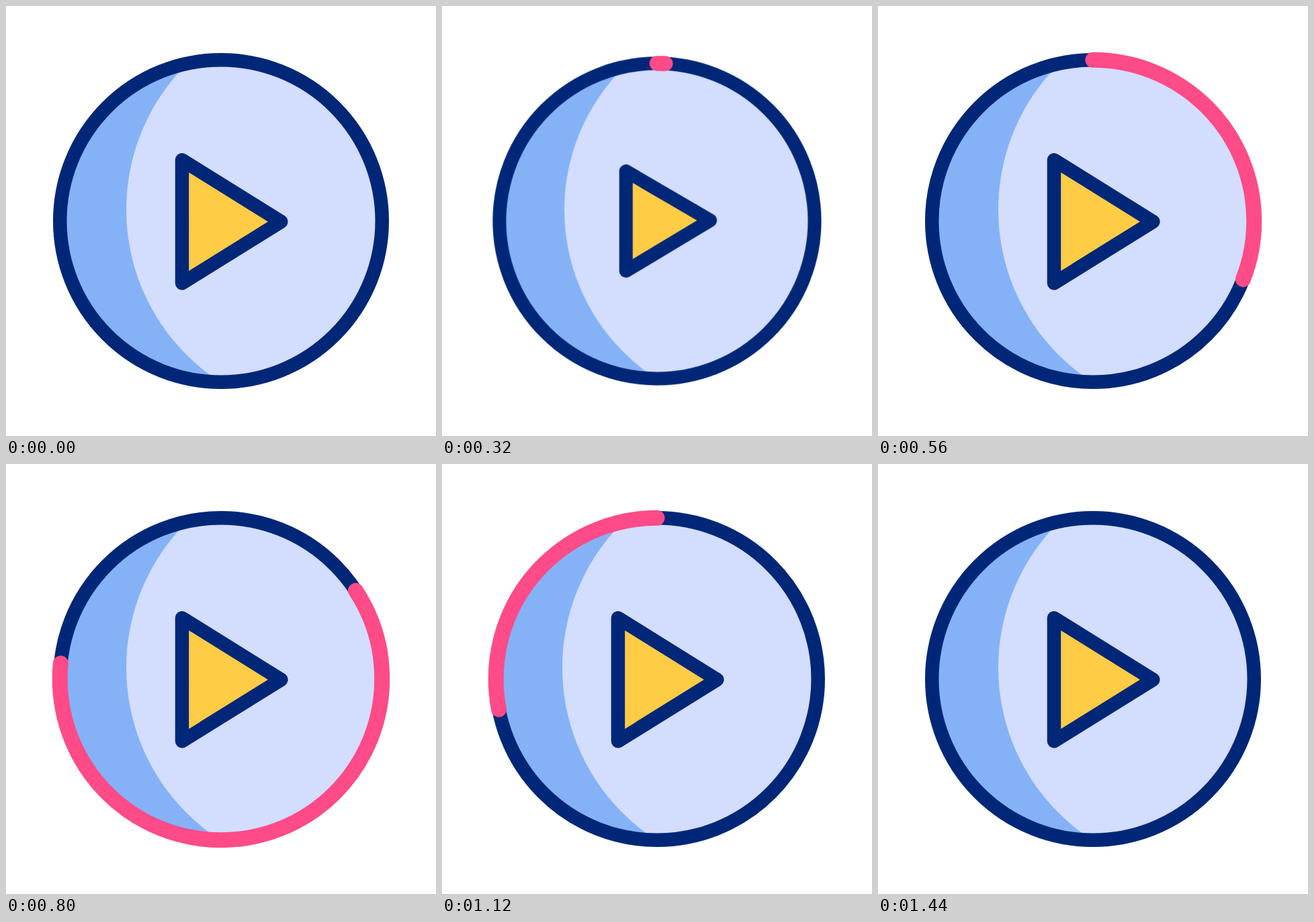
These frames come from a looping animation (640 by 640 pixels, 1480 ms). An HTML page without scripts:

```html
<!DOCTYPE html>
<html lang="en">
<head>
<meta charset="utf-8">
<title>Play button</title>
<style>
  @property --start { syntax: "<length>"; inherits: false; initial-value: 0px; }
  @property --end { syntax: "<length>"; inherits: false; initial-value: 0px; }

  :root {
    --loop: 1480ms;
    --ease: cubic-bezier(.3333, 0, .6667, 1);
    --navy: #002777;
  }
  html, body { margin: 0; width: 100%; height: 100%; overflow: hidden; background: #fff; }
  svg { display: block; width: 100%; height: 100%; }

  .button {
    transform-origin: 320px 320px;
    animation: press var(--loop) var(--ease) infinite;
  }
  .shade { fill: #85b2f7; }
  .light { fill: #d3ddfd; }
  .ring, .triangle { stroke: var(--navy); stroke-width: 20.5; }
  .ring { fill: none; }
  .triangle {
    fill: #ffcc46;
    stroke-linejoin: round;
    d: path("M262 229.2V412.6L409.4 321Z");
    animation: shrink var(--loop) var(--ease) infinite;
  }

  /* The arc is one dash running from --start to --end, in degrees. */
  .progress {
    fill: none;
    stroke: #ff4b88;
    stroke-width: 23;
    stroke-linecap: round;
    stroke-dasharray: calc(var(--end) - var(--start)) 720px;
    stroke-dashoffset: calc(-1 * var(--start));
    animation:
      head var(--loop) var(--ease) infinite,
      tail var(--loop) var(--ease) infinite,
      show var(--loop) step-end infinite;
  }

  @keyframes press {
    0%, 8.108%, 27.027%, 100% { transform: scale(1); }
    18.919% { transform: scale(.9705); }
  }
  @keyframes shrink {
    0%, 8.108%, 27.027%, 100% { d: path("M262 229.2V412.6L409.4 321Z"); }
    18.919% { d: path("M276.8 249.7V389.9L397.8 318.3Z"); }
  }
  @keyframes head {
    0%, 18.919% { --end: 0px; }
    70.27%, 100% { --end: 360px; }
  }
  @keyframes tail {
    0%, 40.541% { --start: 0px; }
    94.595%, 100% { --start: 359.9px; }
  }
  @keyframes show {
    0% { visibility: hidden; }
    18.95% { visibility: visible; }
    97.29%, 100% { visibility: hidden; }
  }
</style>
</head>
<body>
<svg viewBox="0 0 640 640">
  <clipPath id="disc"><circle cx="320" cy="320" r="239"/></clipPath>
  <g class="button">
    <circle class="shade" cx="320" cy="320" r="239"/>
    <circle class="light" cx="484.5" cy="303" r="305.5" clip-path="url(#disc)"/>
    <circle class="ring" cx="320" cy="320" r="239.75"/>
    <path class="triangle"/>
    <path class="progress" pathLength="360" d="M320 80.25a239.75 239.75 0 0 1 0 479.5a239.75 239.75 0 0 1 0-479.5"/>
  </g>
</svg>
</body>
</html>
```
